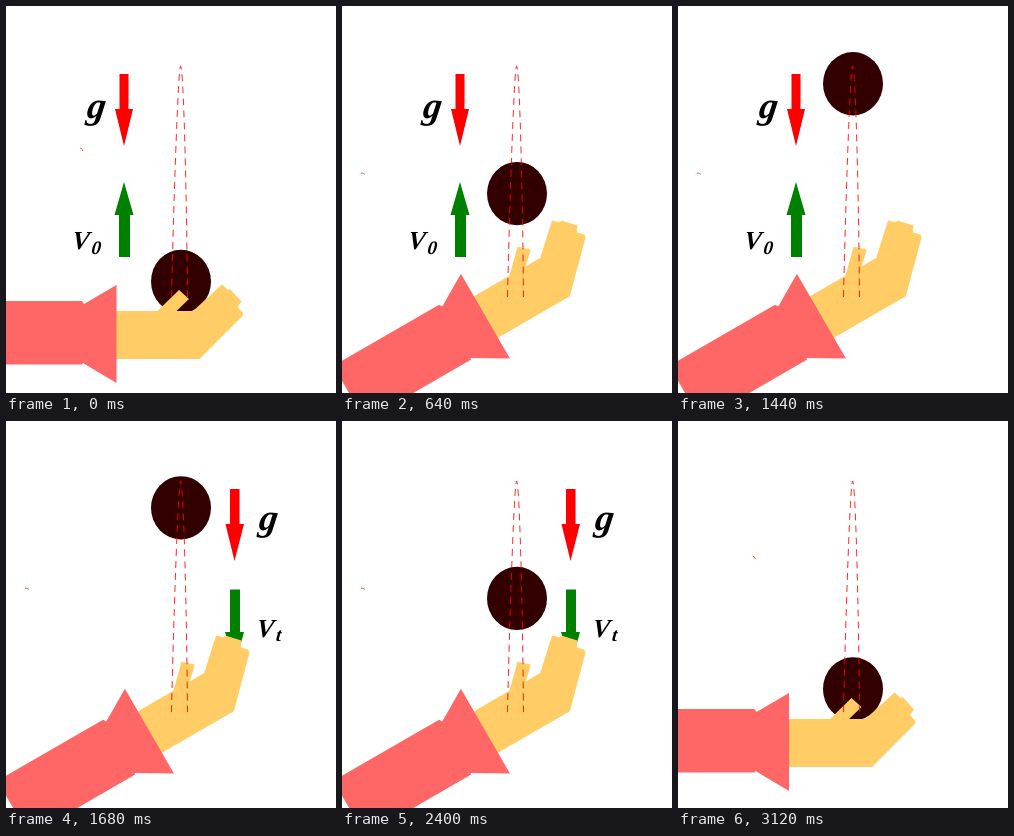
An HTML page for the animation above (3.2 s loop, 330x387 px).

```html
<!DOCTYPE html>
<html lang="en">
<head>
<meta charset="utf-8">
<title>Ball thrown upwards</title>
<style>
  html, body { margin: 0; width: 100%; height: 100%; overflow: hidden; background: #fff; }
  svg { display: block; width: 330px; height: 387px; }
  text { font-family: "Liberation Serif", "Times New Roman", serif; font-weight: bold; font-style: italic; }
  .g { font-size: 37px; }
  .v { font-size: 26px; }
  .sub { font-size: 19px; }
</style>
</head>
<body>
<svg viewBox="0 0 330 387">
  <g id="up">
    <path fill="#f00" d="M113.5 68H122.5V103H127L118 140L109 103H113.5Z"/>
    <path fill="#008000" d="M118 176L127.5 209H124V251H113V209H108.5Z"/>
    <text class="g" transform="translate(80 112) skewX(-8)">g</text>
    <text class="v" transform="translate(65.5 243) skewX(-6)">V</text>
    <text class="sub" transform="translate(85 247.5) skewX(-6)">0</text>
  </g>
  <g id="down">
    <path fill="#f00" d="M224 68H233.5V103H238L228.5 140L219.5 103H224Z"/>
    <path fill="#008000" d="M224 168.500H234V211H238L229 244L219 211H224Z"/>
    <text class="g" transform="translate(252 109) skewX(-8)">g</text>
    <text class="v" transform="translate(250 215.5) skewX(-6)">V</text>
    <text class="sub" transform="translate(269.5 220) skewX(-6)">t</text>
  </g>
  <ellipse id="ball" cx="175" cy="275.5" rx="30" ry="31.7" fill="#300"/>
  <g id="arm">
    <path fill="#fc6" d="M109 305H151.5L173 284L183 293L170.500 305H187L216 278.500L222 284L224 283L235.500 295.500L231.500 301L237 307L236 310.500L193.500 353H109Z"/>
    <path fill="#f66" d="M-46 295H76L78 298L110.500 279V377L77 357L76 358.500H-46Z"/>
    <path fill="none" stroke="#f55" d="M74 142Q76 142 77 145"/>
  </g>
  <path fill="none" stroke="#f00" stroke-width=".85" stroke-dasharray="7 5"
        d="M165.500 291C168 180 172.500 60 174.500 60C177.500 60 180.500 180 181.500 291"/>
</svg>
<script>
const STEP = 80, COUNT = 40, PEAK = 19, LAST = 39;
const PIVOT = [98, 260];

// step, value(s); linear between rows
const ballKeys = [[0, 275.5], [PEAK, 66.7], [LAST, 268]];
const armKeys = [           // step, x, y, angle
  [0, 98, 260, 0],
  [4, 98.6, 257.5, -30],
  [33, 98.6, 257.5, -30],
  [LAST, 98.5, 253, 0]
];

const el = id => document.getElementById(id);
const [up, down, ball, arm] = ["up", "down", "ball", "arm"].map(el);

function sample(keys, n) {
  const i = Math.max(1, keys.findIndex(k => k[0] >= n));
  const a = keys[i - 1], b = keys[i];
  const p = (n - a[0]) / (b[0] - a[0]);
  return a.slice(1).map((v, j) => v + (b[j + 1] - v) * p);
}

const show = (node, on) => node.setAttribute("visibility", on ? "visible" : "hidden");

function draw(n) {
  const [y] = sample(ballKeys, n);
  const [ax, ay, angle] = sample(armKeys, n);
  ball.setAttribute("cy", y);
  arm.setAttribute("transform",
    `translate(${ax} ${ay}) rotate(${angle}) translate(${-PIVOT[0]} ${-PIVOT[1]})`);
  show(up, n < PEAK);
  show(down, n >= PEAK && n < LAST);
}

const start = performance.now();
function tick() {
  draw(Math.floor((performance.now() - start) / STEP) % COUNT);
  requestAnimationFrame(tick);
}
draw(0);
requestAnimationFrame(tick);
</script>
</body>
</html>
```
